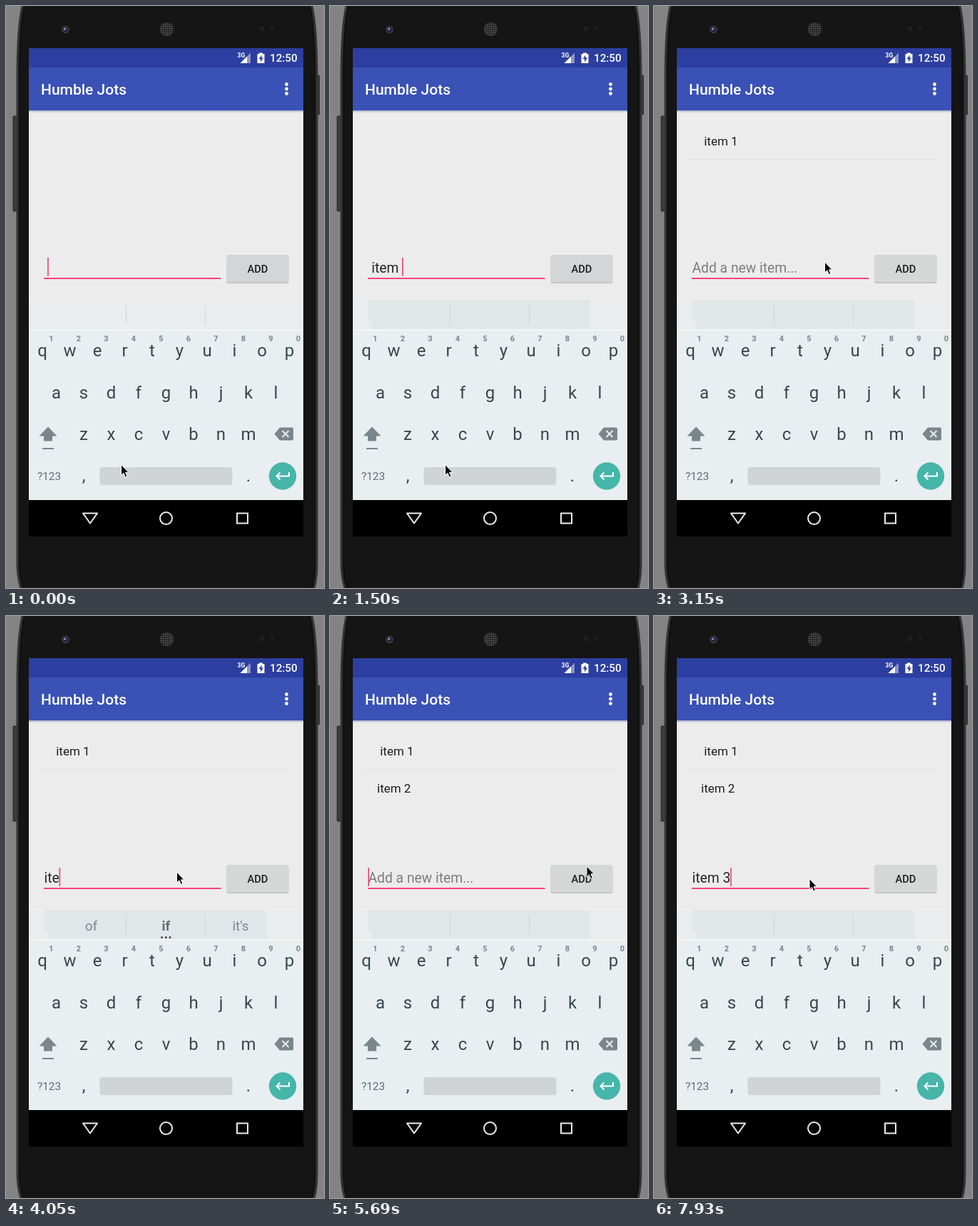
An HTML page for the animation above (8 s loop, 446 by 814 pixels).

```html
<!DOCTYPE html>
<html lang="en">
<head>
<meta charset="utf-8">
<title>Todo app demo</title>
<style>
html, body { margin: 0; width: 100%; height: 100%; overflow: hidden; background: #838383; }
svg { display: block; width: 446px; height: 814px; }
text { font-family: Roboto, sans-serif; white-space: pre; }
.mid { text-anchor: middle; }
.key { font-size: 24px; fill: #37474f; text-anchor: middle; }
.num { font-size: 11px; font-weight: 700; fill: #7b858a; text-anchor: middle; }
.item { font-size: 17px; fill: #1c1c1c; }
.entry { font-size: 19.3px; }
.word { font-size: 19px; fill: #7b878d; text-anchor: middle; }
</style>
</head>
<body>
<svg viewBox="0 0 446 814">
  <defs>
    <linearGradient id="shade" x2="0" y2="1">
      <stop stop-color="#a9aec8"/><stop offset="1" stop-color="#ececec"/>
    </linearGradient>
    <pattern id="mesh" width="3" height="3" patternUnits="userSpaceOnUse">
      <rect width="3" height="3" fill="#202020"/><circle cx="1.5" cy="1.5" r="1" fill="#5d5d5d"/>
    </pattern>
  </defs>

  <!-- phone -->
  <rect width="446" height="814" fill="#838383"/>
  <rect x="10" y="154" width="8" height="133" rx="1" fill="#3c3c3c" stroke="#252525"/>
  <rect x="433" y="97" width="6.5" height="55" rx="1" fill="#3c3c3c" stroke="#252525"/>
  <path d="M24 -4C18 18 16 55 16 100V780C16 795 18 806 22 818H431C435 806 436 795 436 780V100C436 55 434 18 428 -4Z" fill="#151515" stroke="#343434" stroke-width="3"/>
  <path d="M27 -4C21 20 19.500 55 19.500 100V780C19.500 795 21 806 25 818M425 -4C431 20 432.500 55 432.500 100V780C432.500 795 431 806 427 818" fill="none" stroke="#0d0d0d"/>
  <circle cx="83.500" cy="33" r="5.300" fill="#393a42"/>
  <circle cx="83.500" cy="33" r="3.200" fill="#1f2140"/>
  <circle cx="82.700" cy="32" r="1.500" fill="#9a9dd0"/>
  <circle cx="225.500" cy="32.500" r="9.800" fill="url(#mesh)"/>
  <circle cx="359" cy="32" r="3.500" fill="#211f1f"/>
  <circle cx="373" cy="31" r="2.500" fill="#211f1f"/>

  <!-- app -->
  <rect x="32" y="59" width="385" height="683" fill="#ececec"/>
  <rect x="32" y="59" width="385" height="28" fill="#2c3e9f"/>
  <rect x="32" y="86" width="385" height="60" fill="#3a51b6"/>
  <rect x="32" y="146" width="385" height="3.500" fill="url(#shade)"/>
  <g fill="#fff">
    <text x="324.500" y="72" font-size="8.500" font-weight="700">3G</text>
    <path d="M343 65.500V80H328.500Z" opacity=".45"/>
    <path d="M338 70.500V80H328.500Z"/>
    <path d="M355 65.500h5v1.500h2.500v13h-10v-13h2.500Z"/>
    <path d="M358.500 68.500l-4 5.500h2.500v4.500l4-6h-2.500Z" fill="#2c3e9f"/>
    <text x="370" y="78.300" font-size="15.200" font-weight="500">12:50</text>
    <text x="49" y="124" font-size="21" font-weight="500">Humble Jots</text>
    <circle cx="393.500" cy="109.500" r="2.400"/>
    <circle cx="393.500" cy="116" r="2.400"/>
    <circle cx="393.500" cy="122.500" r="2.400"/>
  </g>
  <g id="row1">
    <path d="M48 214.500H400" stroke="#dedede"/>
    <text class="item" x="66" y="194.500"> item 1</text>
  </g>
  <text id="row2" class="item" x="66" y="246.500">item 2</text>

  <text id="hint" class="entry" x="53.500" y="373" fill="#7d7d7d">Add a new item...</text>
  <text id="entry" class="entry" x="53.500" y="373" fill="#272727"></text>
  <rect x="53" y="380" width="248.500" height="2" fill="#f9427f"/>
  <rect id="caret" y="352" width="1.700" height="26" fill="#f0457f"/>
  <rect x="309.500" y="349" width="87" height="39" rx="2" fill="#bfc1c2"/>
  <rect id="button" x="310" y="348" width="86" height="38.500" rx="2"/>
  <text class="mid" x="353" y="373" font-size="14.600" font-weight="500" fill="#1d1d1d">ADD</text>

  <!-- keyboard -->
  <rect x="32" y="411" width="385" height="42" fill="#ebeced"/>
  <path id="tint" d="M53 411H365V451.500H58V440H53Z" fill="#e1e6e9"/>
  <path d="M32 410.500H417" stroke="#f2f2f2"/>
  <path d="M168.500 419V445M279.500 419V445" stroke="#cfd2d4"/>
  <g id="words">
    <text class="word" x="119.500" y="440">of</text>
    <text class="word" x="224.500" y="440" style="fill:#626e74;font-weight:700">if</text>
    <text class="word" x="329" y="440">it's</text>
    <g fill="#37474f"><circle cx="218.500" cy="449.500" r="1.500"/><circle cx="224.300" cy="449.500" r="1.500"/><circle cx="230" cy="449.500" r="1.500"/></g>
  </g>
  <rect x="32" y="453" width="385" height="238" fill="#e9eef1"/>
  <path d="M32 453H417" stroke="#f5f7f8" stroke-width="1.500"/>
  <g id="keys"></g>
  <path d="M59 588.500L71.500 601.500H65V608.500H53V601.500H46.500Z" fill="#7a868b"/>
  <path d="M51 619H67" stroke="#7a868b" stroke-width="2"/>
  <path d="M384 589.500H401Q403 589.500 403 591.500V605.500Q403 607.500 401 607.500H384L376.500 598.500Z" fill="#7a868b"/>
  <path d="M387.500 594l9 9m0-9l-9 9" stroke="#e9eef1" stroke-width="2"/>
  <text class="mid" x="60.500" y="663" font-size="15.400" fill="#5f6c72">?123</text>
  <rect x="131.500" y="645" width="186" height="25" rx="3.500" fill="#d0d4d7"/>
  <circle cx="388" cy="657.500" r="19.200" fill="#46b5aa"/>
  <path d="M397 652V657.500H380M384.500 652.500L379.500 657.500L384.500 662.500" fill="none" stroke="#fff" stroke-width="2"/>

  <rect x="32" y="691" width="385" height="51" fill="#000"/>
  <g fill="none" stroke="#ececec" stroke-width="2">
    <path d="M108 709.500H128L118 723.500Z" stroke-linejoin="round"/>
    <circle cx="224.500" cy="716.500" r="8.500"/>
    <rect x="324" y="709.500" width="15" height="14"/>
  </g>

  <path id="pointer" d="M.5 .5V15.500L3.900 12.300L6.300 18L8.900 16.900L6.500 11.400H11Z" fill="#080808" stroke="#fff" stroke-width="1" stroke-linejoin="round"/>
</svg>
<script>
const LOOP = 8000;
const el = id => document.getElementById(id);
const pen = document.createElement("canvas").getContext("2d");

// typing start, digit shown, item added
const entries = [
  { start: 750, digit: 1650, add: 2550, lead: " " },
  { start: 3600, digit: 4650, add: 5390, lead: "" },
  { start: 6890, digit: 7930, add: LOOP, lead: "" }
];
const caretOff = [[300, 750], [3150, 3600], [5240, 5690], [6290, 6890]];
const path = [
  [0, 161, 641], [1650, 161, 641], [2250, 338, 375], [2700, 338, 375],
  [3150, 239, 357.5], [4650, 239, 357.5], [5090, 359.5, 349.5],
  [5690, 359.5, 349.5], [5990, 217.5, 367], [LOOP, 217.5, 367]
];

function drawKeys() {
  const put = (s, x, y, cls = "key") =>
    `<text class="${cls}" x="${x.toFixed(1)}" y="${y}">${s}</text>`;
  const row = (s, x, y) => [...s].map((c, i) => put(c, x + i * 38.5, y)).join("");
  const nums = [..."1234567890"].map((c, i) => put(c, 63.5 + i * 38.5, 469, "num")).join("");
  el("keys").innerHTML = nums + row("qwertyuiop", 51, 490) + row("asdfghjkl", 70.5, 548.5) +
    row("zxcvbnm", 109, 607) + put(",", 109, 665) + put(".", 340, 665);
}

const within = (t, a, b) => t >= a && t < b;
const show = (id, on) => el(id).setAttribute("visibility", on ? "visible" : "hidden");

function typed(t) {
  const i = entries.findIndex(e => t < e.add), e = entries[i];
  if (t < e.start) return e.lead;
  if (t >= e.digit) return e.lead + "item " + (i + 1);
  const n = Math.floor((t - e.start) / 150);
  return e.lead + "item ".slice(0, n < 3 ? n + 1 : Math.min(n, 5));
}

// the pointer is sampled every 150 ms
function pointerAt(t) {
  const base = t < 4940 ? 0 : 4940;
  const s = base + Math.floor((t - base) / 150) * 150;
  const i = path.findIndex(p => p[0] > s);
  const [t0, x0, y0] = path[i - 1], [t1, x1, y1] = path[i];
  const u = (s - t0) / (t1 - t0), k = u * u * (3 - 2 * u);
  return [x0 + (x1 - x0) * k, y0 + (y1 - y0) * k];
}

function render(t) {
  const text = typed(t);
  el("entry").textContent = text;
  show("hint", !text);
  pen.font = "19.3px Roboto, sans-serif";
  el("caret").setAttribute("x", 53.3 + pen.measureText(text).width);
  show("caret", !caretOff.some(([a, b]) => within(t, a, b)));
  show("row1", t >= entries[0].add);
  show("row2", t >= entries[1].add);
  show("tint", t >= entries[0].start);
  show("words", entries.some(e => within(t, e.start + 450, e.start + 750)));
  const pressed = within(t, 2400, 2700) || within(t, 5240, 5390);
  el("button").setAttribute("fill", pressed ? "#cbcdcc" : t < 2400 ? "#d3d6d8" : "#d5d7d6");
  el("pointer").setAttribute("transform", `translate(${pointerAt(t)})`);
}

drawKeys();
const begin = performance.now();
function tick() {
  render((performance.now() - begin) % LOOP);
  requestAnimationFrame(tick);
}
tick();
</script>
</body>
</html>
```
